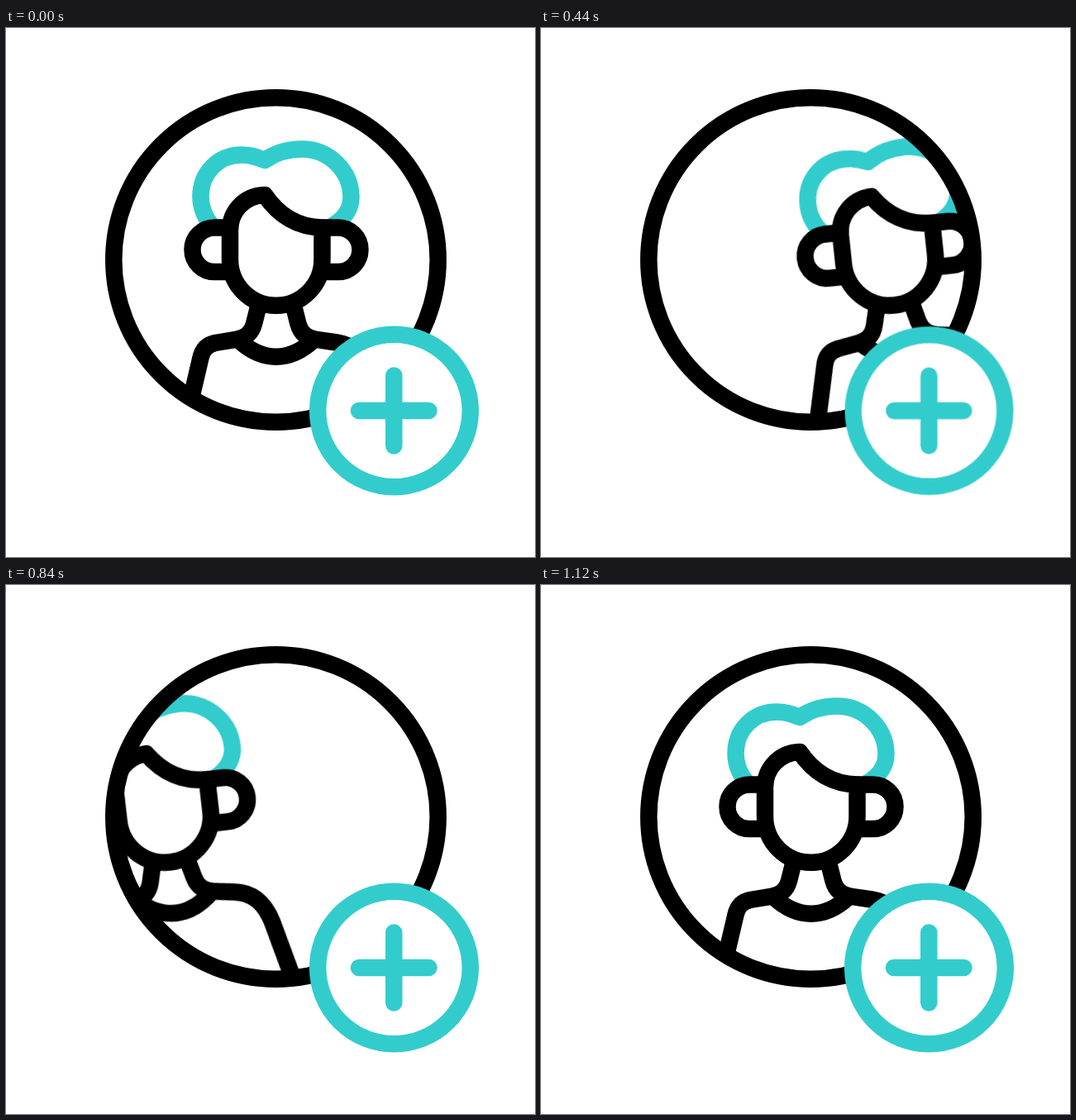
Write an HTML page without scripts that moves like this. It is 640 px wide and 640 px high and loops after 1.48 s.

```html
<!DOCTYPE html>
<html lang="en">
<head>
<meta charset="utf-8">
<title>Add user</title>
<style>
html, body { margin: 0; width: 100%; height: 100%; overflow: hidden; background: #fff; }
svg { display: block; width: 100vw; height: 100vh; }
.line { fill: none; stroke: #000; stroke-width: 20.5; stroke-linejoin: round; }
.teal { stroke: #33cccc; }
.leave, .enter { transform-origin: 327px 268px; animation: leave 1480ms linear infinite; }
.enter { animation-name: enter; }
.badge { transform-origin: 469.5px 463px; animation: pulse 1480ms ease-in-out infinite; }

@keyframes leave {
  0%, 6.76% { transform: translateX(0) rotate(0deg); }
  13.51% { transform: translateX(7px) rotate(-1.6deg); }
  18.92% { transform: translateX(23px) rotate(-3.2deg); }
  24.32% { transform: translateX(50.5px) rotate(-4.8deg); }
  29.73% { transform: translateX(93px) rotate(-6deg); }
  35.14% { transform: translateX(141px) rotate(-6.1deg); }
  40.54% { transform: translateX(190px) rotate(-5.3deg); }
  45.95% { transform: translateX(239px) rotate(-3.5deg); }
  51.35% { transform: translateX(288px) rotate(-1.5deg); }
  59.46%, 100% { transform: translateX(420px) rotate(0deg); }
}
@keyframes enter {
  0%, 32.43% { transform: translateX(-420px) rotate(-21deg); }
  35.14% { transform: translateX(-338px) rotate(-21deg); }
  37.84% { transform: translateX(-306px) rotate(-18.8deg); }
  40.54% { transform: translateX(-280px) rotate(-16.8deg); }
  45.95% { transform: translateX(-231px) rotate(-13deg); }
  51.35% { transform: translateX(-184px) rotate(-9.5deg); }
  56.76% { transform: translateX(-136.5px) rotate(-6.6deg); }
  64.86% { transform: translateX(-65px) rotate(-3.3deg); }
  70.27% { transform: translateX(-27px) rotate(-1.4deg); }
  75.68%, 100% { transform: translateX(0) rotate(0deg); }
}
@keyframes pulse {
  0%, 32.43%, 100% { transform: scale(1); }
  16.22% { transform: scale(.905); }
}
</style>
</head>
<body>
<svg viewBox="0 0 640 640">
  <defs>
    <clipPath id="window"><circle cx="326.5" cy="280.5" r="196"/></clipPath>
    <g id="person" class="line">
      <path class="teal" d="M250 240C241 231 235.5 217 235.5 204C235.5 174 258 153.5 285 153.5C295 153.5 304 156 313 160C326 151 341 146.5 358 146.5C391 146.5 417.5 173 417.5 205C417.5 219 409 232 392 241"/>
      <!-- face and fringe -->
      <path d="M313 202C288 203 271 222 271 245V280a55.75 55.75 0 0 0 111.5 0V241.5C350 241 328 224 313 202Z"/>
      <!-- ears -->
      <path d="M271 241.5H252.25a26.75 26.75 0 0 0 0 53.5H273M382.5 241.5H401.75a26.75 26.75 0 0 1 0 53.5H380.5"/>
      <!-- neck, shoulders, collar -->
      <path d="M305 338L300 358C297 369 290 375 278 376.8L253 381C242 383.5 237.5 390 235.5 399L218 474"/>
      <path d="M348.5 338L353.5 358C356.5 369 363.5 375 375.5 376.8L400 380.5C424 384 435 400 441 421L457 487"/>
      <path d="M282 378C296 391 310 397.7 326.75 397.7S357.5 391 371.5 378"/>
    </g>
  </defs>
  <g clip-path="url(#window)">
    <g class="leave"><use href="#person"/></g>
    <g class="enter"><use href="#person"/></g>
  </g>
  <circle class="line" cx="326.5" cy="280.5" r="196.2"/>
  <g class="badge">
    <circle class="line teal" cx="469.5" cy="463" r="92.3" style="fill:#fff"/>
    <path class="line teal" stroke-linecap="round" d="M427 463h84.5M469.3 420.5v85"/>
  </g>
</svg>
</body>
</html>
```
